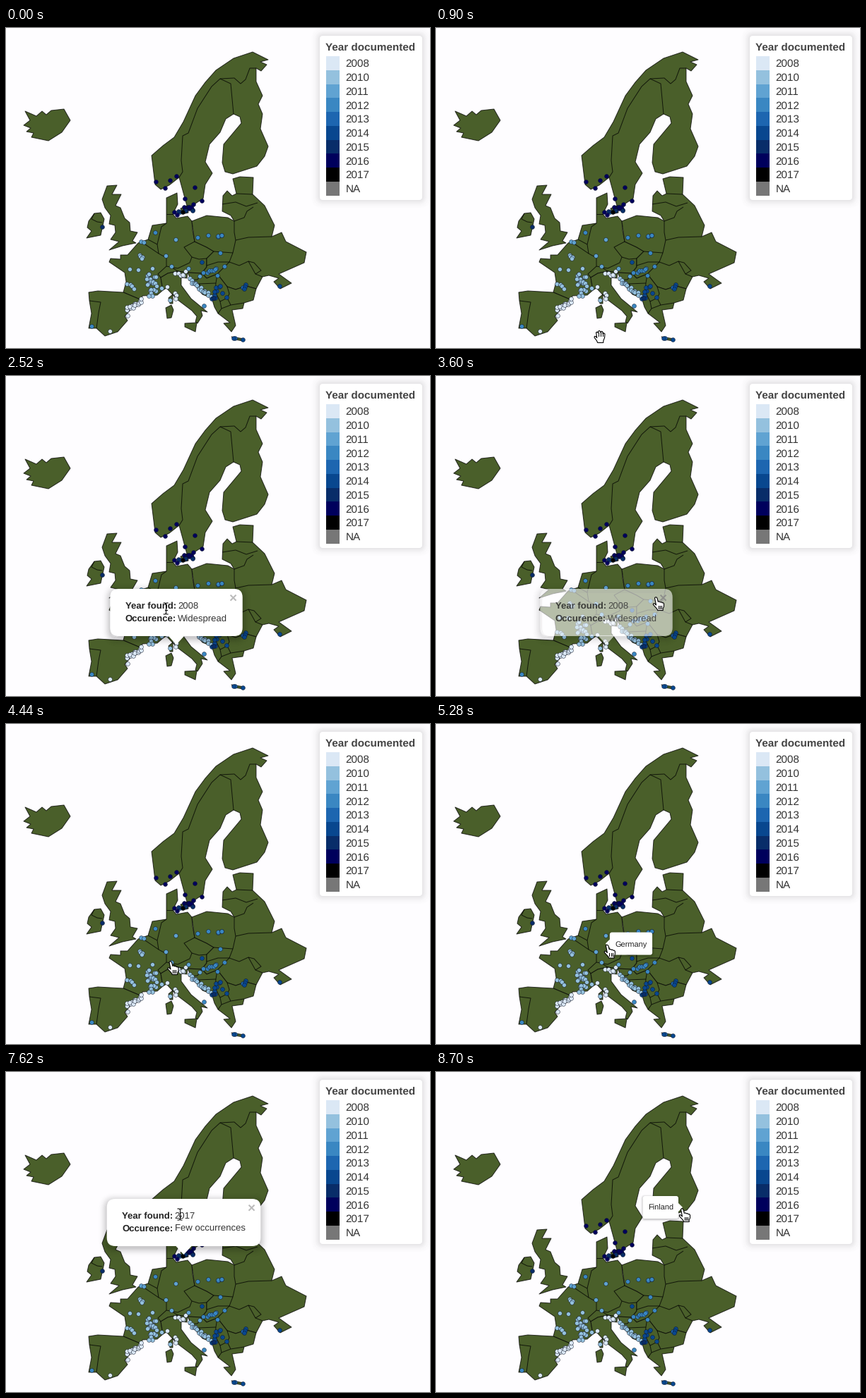
Animation of 600x454 px, one loop 8.76 s. Source, as a matplotlib script:

```python
import numpy as np
import matplotlib.pyplot as plt
from matplotlib.animation import FuncAnimation
from matplotlib.collections import LineCollection, PolyCollection
from matplotlib.patches import FancyBboxPatch, Polygon, Rectangle
from matplotlib.path import Path
from matplotlib.textpath import TextPath
from matplotlib.transforms import Affine2D

W, H, DPI = 600, 454, 100
STEP, LOOP = 60, 8760
PT = 72 / DPI
FONT = "Liberation Sans"
LAND, BORDER = "#4a5f2a", (0, 0, 0, .75)

plt.rcParams["text.hinting"] = "no_hinting"
rng = np.random.default_rng(8)
fig = plt.figure(figsize=(W / DPI, H / DPI), dpi=DPI, facecolor="#fefdff")
ax = fig.add_axes([0, 0, 1, 1])
ax.axis("off")


def pairs(values):
    return np.array(values, float).reshape(-1, 2)


def text(x, y, s, px, color="#333", weight="normal", **kw):
    return ax.text(x, y, s, size=px * PT, color=color, weight=weight,
                   family=FONT, **kw)


def text_width(s, px, weight="normal"):
    path = TextPath((0, 0), s, size=px, prop={"family": FONT, "weight": weight})
    return path.get_extents().x1


def rounded(x, y, w, h, r, z, **kw):
    return ax.add_patch(FancyBboxPatch(
        (x, y), w, h, boxstyle=f"round,pad=0,rounding_size={r}", zorder=z, **kw))


def card(x, y, w, h, r, z, blur, strength, drop=0):
    """White rounded box inside shadow rings; returns (outset, patch) pairs."""
    parts = []
    for d in np.arange(blur, -drop, -1) - .5:
        alpha = strength * (1 - max(d, 0) / blur) ** 2
        ring = rounded(x - d, y - d + drop, w + 2 * d, h + 2 * d, r + max(d, 0), z,
                       fc="none", ec="black", lw=PT, alpha=alpha)
        parts.append((d, ring))
    parts.append((0, rounded(x, y, w, h, r, z, fc="white", lw=0, alpha=1)))
    return parts


# Map: region outlines, then the borders inside them
regions, borders = [], []


def region(*xy):
    regions.append(pairs(xy))


def border(*xy):
    borders.append(pairs(xy))


# Iceland, Britain, Ireland
region(27, 118, 34, 121, 43, 125, 51, 118, 57, 123, 64, 117, 82, 115, 91, 131,
       79, 148, 60, 160, 36, 155, 39, 149, 29, 147, 35, 142, 25, 138, 34, 131)
region(143, 224, 157, 223, 150, 236, 163, 236, 155, 252, 162, 255, 168, 270, 175, 276,
       176, 288, 186, 290, 179, 302, 184, 305, 165, 309, 146, 315, 160, 303, 148, 300,
       155, 290, 154, 280, 146, 278, 148, 266, 140, 255, 136, 243)
region(125, 263, 134, 262, 139, 271, 134, 294, 114, 298, 121, 288, 115, 283, 117, 274)
border(125, 263, 121, 271, 129, 275, 136, 276)

# Scandinavia
region(206, 181, 222, 167, 238, 155, 251, 133, 268, 96, 282, 77, 297, 60, 322, 43,
       349, 34, 371, 45, 360, 48, 369, 52, 361, 61, 354, 57, 354, 76, 363, 96,
       357, 108, 363, 122, 360, 143, 371, 168, 366, 182, 355, 196, 321, 207,
       310, 204, 306, 191, 308, 165, 333, 135, 331, 126, 322, 122, 311, 129,
       303, 148, 288, 165, 282, 190, 292, 206, 282, 222, 279, 242, 257, 256,
       245, 212, 231, 223, 219, 229, 211, 222)
border(245, 212, 250, 204, 248, 188, 250, 153, 258, 149, 271, 114, 291, 83, 303, 72,
       323, 71, 332, 79, 339, 73, 345, 57, 354, 57)
border(303, 72, 318, 79, 322, 122)

# France to Denmark and the Alps
region(146, 332, 148, 327, 162, 328, 162, 322, 172, 322, 187, 305, 201, 300, 207, 280,
       227, 277, 227, 241, 242, 234, 243, 250, 236, 264, 241, 270, 257, 267, 263, 274,
       264, 287, 267, 303, 284, 311, 294, 317, 284, 327, 284, 339, 277, 348, 257, 347,
       243, 345, 229, 348, 219, 354, 222, 372, 214, 379, 193, 380, 192, 386, 166, 375,
       170, 360, 168, 347)
border(191, 303, 216, 320, 227, 326, 227, 338, 215, 349, 219, 354)
border(216, 320, 214, 307, 220, 282, 227, 277)
border(201, 300, 214, 307)
border(227, 338, 243, 341, 260, 333, 263, 325, 252, 311, 267, 303)
border(263, 325, 273, 328, 284, 327)
border(227, 264, 236, 264)
border(235, 340, 243, 345)

# Baltics to Romania
region(263, 274, 284, 266, 314, 269, 323, 274, 318, 266, 306, 260, 307, 238, 313, 231,
       320, 238, 326, 235, 321, 214, 331, 211, 350, 212, 349, 236, 366, 252, 380, 280,
       376, 296, 390, 290, 396, 303, 425, 318, 422, 333, 386, 349, 404, 362, 388, 370,
       379, 360, 386, 355, 372, 351, 363, 353, 354, 370, 340, 366, 325, 371, 313, 367,
       299, 349, 284, 355, 277, 348, 284, 339, 284, 327, 294, 317, 284, 311, 267, 303)
border(326, 235, 349, 236)
border(306, 250, 325, 247, 340, 253, 356, 248)
border(350, 254, 341, 260, 337, 269, 323, 274, 323, 290, 325, 301, 321, 319, 316, 332,
       299, 349)
border(325, 301, 343, 297, 376, 296)
border(294, 317, 321, 319)
border(284, 337, 300, 332, 316, 332, 330, 337, 343, 331, 353, 349, 363, 353)
border(343, 331, 351, 333, 361, 344, 353, 349)

# Balkans
region(257, 347, 277, 348, 284, 355, 299, 349, 313, 367, 325, 371, 340, 366, 354, 370,
       350, 386, 337, 390, 335, 398, 320, 400, 325, 422, 319, 431, 308, 419, 317, 418,
       300, 405, 295, 396, 291, 383, 278, 378, 263, 360)
border(258, 358, 271, 357, 277, 348)
border(297, 362, 273, 363, 281, 374, 291, 383, 296, 374)
border(299, 349, 297, 362, 296, 374, 303, 388, 305, 398, 300, 405)
border(313, 367, 316, 377, 313, 383, 303, 388)
border(313, 383, 318, 393, 337, 390)
border(318, 393, 305, 398)

# Italy, Iberia, small islands
region(219, 354, 229, 348, 243, 345, 257, 347, 256, 355, 248, 354, 248, 365, 262, 384,
       285, 403, 276, 401, 278, 408, 271, 419, 268, 417, 270, 409, 263, 401, 242, 385,
       227, 369, 222, 372)
region(117, 375, 130, 373, 166, 375, 192, 386, 191, 392, 176, 400, 168, 409, 172, 415,
       158, 431, 140, 437, 128, 426, 117, 426, 121, 405, 118, 387)
border(118, 387, 134, 389, 131, 404, 128, 426)
region(253, 419, 270, 418, 268, 431, 253, 424)
region(226, 397, 234, 393, 237, 400, 234, 411, 228, 412)
region(230, 383, 236, 378, 236, 391, 232, 391)
region(319, 438, 337, 441, 335, 444, 324, 442)
region(247, 256, 257, 252, 258, 262, 250, 264)

ax.add_collection(PolyCollection(regions, fc=LAND, ec=BORDER, lw=.72, zorder=1))
ax.add_collection(LineCollection(borders, colors=[BORDER], lw=.72, zorder=1))
shores = [Path(r) for r in regions]
CENTRES = {"Finland": (340, 160), "Sweden": (270, 180), "Germany": (240, 303),
           "Poland": (295, 292), "Czech Republic": (272, 317), "Austria": (265, 340),
           "Slovakia": (300, 326), "France": (190, 345), "Italy": (240, 385)}

# Observations
SHADES = {"2008": "#dbe8f5", "2010": "#94c1de", "2011": "#60a3d2", "2012": "#3a87c2",
          "2013": "#1d66b0", "2014": "#08478f", "2015": "#082d69", "2016": "#00005c",
          "2017": "#000000", "NA": "#777777"}
markers = []


def dots(year, *xy):
    p = pairs(xy)
    markers.extend(p)
    ax.scatter(*p.T, s=(5.9 * PT) ** 2, c=SHADES[year], ec=(.05, .08, .15, .65),
               lw=.5, zorder=2)


def trail(year, n, start, end, spread):
    """Dots strewn along a line."""
    line = np.linspace(start, end, n)
    dots(year, *(line + rng.uniform(-spread, spread, line.shape)).ravel())


trail("2010", 4, (190, 320), (192, 328), 2)
trail("2010", 24, (206, 351), (206, 378), 7)
trail("2010", 4, (173, 363), (182, 370), 2)
trail("2010", 16, (260, 357), (288, 380), 2.5)
dots("2010", 175, 342, 187, 343, 207, 341, 220, 369, 232, 386)
trail("2008", 14, (171, 399), (192, 386), 3)
trail("2008", 6, (242, 351), (252, 348), 3)
dots("2008", 172, 408, 147, 430, 228, 367, 239, 376, 241, 379, 240, 384)
dots("2011", 226, 323, 240, 300, 258, 341, 234, 338, 274, 352, 191, 303, 195, 304)
trail("2012", 8, (281, 348), (297, 341), 2)
trail("2012", 4, (299, 296), (306, 294), 1.5)
dots("2012", 211, 290, 271, 297, 286, 294, 303, 319, 309, 338, 299, 351, 280, 394, 121, 423)
dots("2013", 246, 261, 335, 368, 324, 440)
trail("2014", 9, (293, 386), (301, 364), 3)
trail("2014", 3, (338, 365), (338, 370), 1.5)
dots("2014", 277, 332, 387, 366, 306, 376, 312, 382, 322, 440, 335, 442)
trail("2016", 10, (251, 254), (264, 257), 2.5)
dots("2015", 136, 282, 244, 260, 264, 259, 254, 259, 294, 383)
dots("2016", 212, 218, 225, 227, 232, 216, 241, 210, 267, 226, 277, 245, 253, 242,
     265, 250, 238, 261, 242, 265)
dots("2017", 250, 261)
markers = np.array(markers)

# Legend
card(444, 11, 145, 233, 5, 3, 14, .1)
text(452.5, 32.5, "Year documented", 15.3, "#444", "bold", zorder=4)
for i, (label, shade) in enumerate(SHADES.items()):
    y = 40 + 19.75 * i
    ax.add_patch(Rectangle((453, y), 19, 19.75, fc=shade, lw=0, zorder=4))
    text(480.5, y + 15.2, label, 15.3, zorder=4)


class Popup:
    HEIGHT = 67

    def __init__(self, cx, bottom, year, spread, opens, closes):
        rows = [("Year found:", year), ("Occurence:", spread)]
        px, gap = 13.1, 3.6
        starts = [text_width(k, px, "bold") + gap for k, _ in rows]
        inner = max(s + text_width(v, px) for s, (_, v) in zip(starts, rows))
        self.w = inner + 44
        self.x, self.y = cx - self.w / 2, bottom - self.HEIGHT
        self.opens, self.closes = opens, closes
        boxes = [p for _, p in card(self.x, self.y, self.w, self.HEIGHT, 12, 5, 13, .2, 3)]
        tip = [(cx - 12, bottom - 1), (cx + 12, bottom - 1), (cx, bottom + 12)]
        boxes.append(ax.add_patch(Polygon(tip, fc="white", lw=0, zorder=5, alpha=1)))
        self.boxes = [(p, p.get_alpha()) for p in boxes]
        self.texts = []
        for i, ((key, value), start) in enumerate(zip(rows, starts)):
            x, y = self.x + 21.5, self.y + 28 + 18 * i
            self.texts += [text(x, y, key, px, "#222", "bold", zorder=6),
                           text(x + start, y, value, px, zorder=6)]
        self.cross = self.x + self.w - 14, self.y + 12
        self.mark = text(*self.cross, "×", 19, "#bbb", "bold", ha="center",
                         va="center_baseline", zorder=6)
        self.texts.append(self.mark)

    def fade(self, t):
        a = min((t - self.opens) / 200, 1 - (t - self.closes) / 200, 1)
        a = max(a, 0)
        for box, base in self.boxes:
            box.set_visible(a > 0)
            box.set_alpha(base * a)
        # text sits on an already faded box, so it fades later
        for item in self.texts:
            item.set_alpha(1 - (1 - a) ** 2)
        return a

    def cursor_at(self, x, y):
        """Cursor kind over this popup, or None outside it."""
        dx, dy = x - self.x, y - self.y
        on_cross = np.hypot(x - self.cross[0], y - self.cross[1]) < 14
        self.mark.set_color("#888" if on_cross else "#bbb")
        if on_cross:
            return "point"
        if not (0 < dx < self.w and 0 < dy < self.HEIGHT):
            return None
        return "beam" if 20 < dx < self.w - 20 and 15 < dy < 52 else "arrow"


popups = [Popup(241, 369, "2008", "Widespread", 1860, 3520),
          Popup(251.5, 247, "2017", "Few occurrences", 6660, 8340)]

# Country tooltip
tip_card = card(0, 0, 50, 32, 3, 7, 4, .2, 1)
tip_arrow = ax.add_patch(Polygon([(0, 0), (1, 1), (1, 0)], fc="white", lw=0, zorder=7))
tip_text = text(0, 0, "", 11, "#222", ha="center", va="center_baseline", zorder=8)
tip_sizes = {name: text_width(name, 11) + 15 for name in CENTRES}


def show_tooltip(name, x, y):
    for part in [p for _, p in tip_card] + [tip_arrow, tip_text]:
        part.set_visible(bool(name))
    if not name:
        return
    w, h, y = tip_sizes[name], 32, y - 3
    side = -1 if x > W / 2 else 1
    edge = x + 4.5 * side
    left = edge - w if side < 0 else edge
    for d, part in tip_card:
        part.set_bounds(left - d, y - h / 2 - d + (d != 0), w + 2 * d, h + 2 * d)
    tip_arrow.set_xy([(edge, y - 6), (edge, y + 6), (edge - 6 * side, y)])
    tip_text.set_text(name)
    tip_text.set_position((left + w / 2, y))


# Cursors, drawn around their hot spots
cursors = {}


def cursor(kind, outline, strokes=(), fill="white"):
    shapes = []
    if outline:
        shapes.append(ax.add_patch(Polygon(pairs(outline), fc=fill, ec="black", lw=.8,
                                           joinstyle="round", zorder=9)))
    for s in strokes:
        shapes += ax.plot(*pairs(s).T, color="black", lw=.75, zorder=10)
    cursors[kind] = shapes


cursor("point", [-1, 0, 0, -1.2, 1.6, -1, 2.6, .5, 3.8, 5.3, 5.4, 4.8, 6.8, 6, 8.2, 5.5,
                 9.5, 6.8, 11, 6.6, 12, 8, 12, 12, 10.7, 15, 10.7, 17.5, 3, 17.5,
                 2.6, 15.8, -.8, 12, -3.2, 9.3, -2.8, 7.8, -1.2, 7.8, 1, 10],
       [[x, 10.5, x, 14.5] for x in (4, 6.2, 8.4)])
cursor("grab", [-4.8, -5.5, -3.3, -6.3, -2.2, -5, -1.6, -7.3, 0, -8, 1.3, -6.8, 1.6, -5.5,
                3, -7.2, 4.5, -6.4, 4.8, -3.6, 6.2, -4.6, 7.6, -3.5, 7.2, 2, 5.6, 6,
                5.3, 9, -2.6, 9, -4, 6, -7.3, 1.6, -7, 0, -5.4, 0, -3.6, 2.2, -4, -1],
       [[x, -5, x, 0] for x in (-1.8, 1.5, 4.5)])
cursor("arrow", [0, 0, 0, 14, 3.2, 11, 5.4, 16, 7.6, 15, 5.5, 10.2, 9.8, 10.2],
       fill="black")
cursor("beam", [], [[0, -7, 0, 7], [-3, -8, -1, -8, 0, -7, 1, -8, 3, -8],
                    [-3, 8, -1, 8, 0, 7, 1, 8, 3, 8], [-1.5, 2, 1.5, 2]])

# Stops of the pointer: arrival, departure, place
STOPS = [(420, 420, 228, 475), (1500, 1900, 236, 385), (2500, 2500, 226, 330),
         (3300, 3760, 310.5, 315), (4320, 4900, 232, 338), (5900, 6240, 261, 265.5),
         (6500, 6800, 251, 260), (7450, 7740, 246, 202), (8240, LOOP, 347.5, 195)]


def pointer(t):
    for (_, leave, *a), (arrive, _, *b) in zip(STOPS, STOPS[1:]):
        if t <= arrive:
            break
    u = np.clip((t - leave) / (arrive - leave), 0, 1)
    u = u * u * (3 - 2 * u)
    return np.array(a) * (1 - u) + np.array(b) * u


def hover(x, y, active):
    """Cursor kind and country label under the pointer."""
    for popup in active:
        kind = popup.cursor_at(x, y)
        if kind:
            return kind, None
    if np.hypot(*(markers - (x, y)).T).min() < 5:
        return "point", None
    if any(shore.contains_point((x, y)) for shore in shores):
        return "point", min(CENTRES, key=lambda c: np.hypot(CENTRES[c][0] - x,
                                                            CENTRES[c][1] - y))
    return "grab", None


def draw(n):
    t = n * STEP
    active = [p for p in popups if p.fade(t) > 0]
    kind = name = None
    x = y = 0
    if t >= STOPS[0][0]:
        x, y = pointer(t)
        kind, name = hover(x, y, active)
    show_tooltip(name, x, y)
    place = Affine2D().translate(x, y) + ax.transData
    for key, shapes in cursors.items():
        for shape in shapes:
            shape.set_visible(key == kind)
            shape.set_transform(place)
    return []


ax.set_xlim(0, W)
ax.set_ylim(H, 0)
anim = FuncAnimation(fig, draw, frames=LOOP // STEP, init_func=lambda: draw(0),
                     interval=STEP, repeat=True, repeat_delay=0, blit=False)
plt.show()
```
